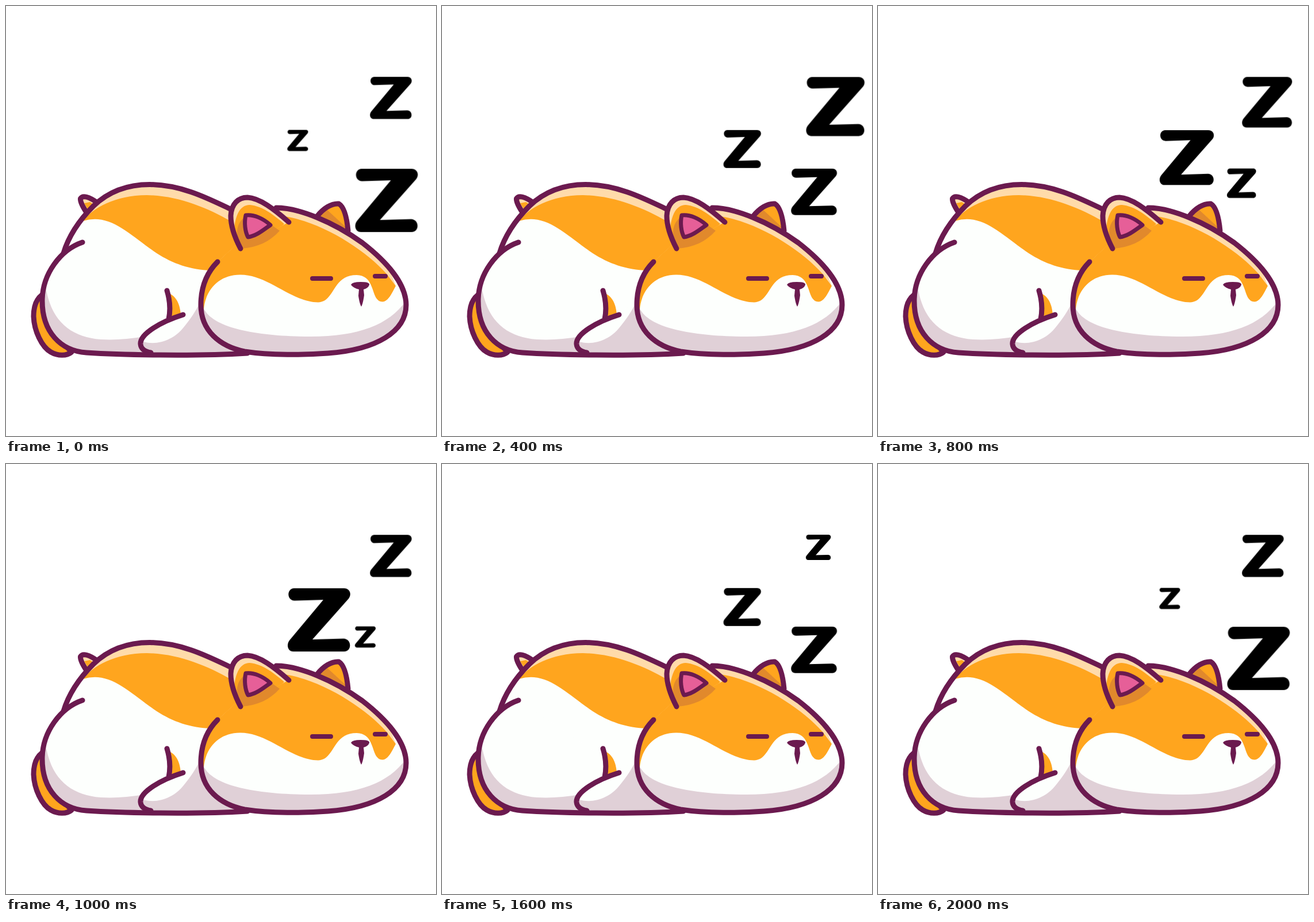
Recreate the animation shown at these times as an HTML page. Size 748 px wide and 748 px high, loop 2100 ms.

```html
<!DOCTYPE html>
<html lang="en">
<head>
<meta charset="utf-8">
<title>Sleeping hamster</title>
<style>
  html, body { margin: 0; width: 100%; height: 100%; overflow: hidden; background: #fff; }
  svg { display: block; width: 100vw; height: 100vh; }

  .white { fill: #fdfffd; }
  .orange { fill: #ffa51e; }
  .light { fill: #ffdbaa; }
  .dark { fill: #e1892c; }
  .shade { fill: #e0d0d7; }
  .pink { fill: #e65f98; }
  .plum { fill: #6b1a4f; }
  .line { stroke: #6b1a4f; stroke-width: 9; stroke-linecap: round; stroke-linejoin: round; }
  .open { fill: none; }

  /* 2000 ms of swelling and shrinking in 100 ms steps, then a 100 ms hold */
  .z { animation: 2100ms steps(10) infinite; }
  .grow { animation-name: grow; }
  .shrink { animation-name: shrink; }
  .swing { animation-name: swing; }

  @keyframes grow {
    0%, 95.238%, 100% { transform: scale(.333); }
    47.619% { transform: scale(1); }
  }
  @keyframes shrink {
    0%, 95.238%, 100% { transform: scale(1); }
    47.619% { transform: scale(.333); }
  }
  @keyframes swing {
    0% { transform: scale(.667); animation-timing-function: steps(5); }
    23.809% { transform: scale(1); }
    71.428% { transform: scale(.333); animation-timing-function: steps(5); }
    95.238%, 100% { transform: scale(.667); }
  }
</style>
</head>
<body>
<svg viewBox="0 0 748 748">
  <defs>
    <path id="back" d="M100 430C109 400 126 374 152 348C178 323 210 310.500 250 310.500C305 311 350 334 390 353"/>
    <path id="backArea" d="M100 430C109 400 126 374 152 348C178 323 210 310.500 250 310.500C305 311 350 334 390 353L420 400V603Z"/>
    <path id="hip" d="M133 411C95 424 63 466 63 513C63 567 95 600 140 603C200 607 330 609.500 420 604"/>
    <path id="head" d="M368 445C348 465 339 492 339 520C339 565 372 592 415 601C460 608 520 607 560 604C645 598 696 566 696 520C696 485 665 447 620 412C570 376 510 351 470 351"/>
    <path id="ear" d="M408 422C397 401 391 382 391 365C392 344 404 333 420 333C441 334 466 353 492 376"/>
    <path id="farEar" d="M541 366C552 352 566 343 579 344C589 350 593 369 595 391"/>
    <path id="zee" d="M12 1H99C109 1 113 11 107 19L44 90L98 88.500C113 89 113 111 99 111H11C1 111 -2 99 4.500 91L63 21L13 22.500C-1 22 -1 1.500 12 1Z"/>
    <clipPath id="inBody"><use href="#backArea"/><use href="#hip"/></clipPath>
    <clipPath id="inHead"><use href="#head"/></clipPath>
    <clipPath id="inEar"><use href="#ear"/></clipPath>
    <clipPath id="inFarEar"><use href="#farEar"/></clipPath>
  </defs>

  <!-- tail and hind foot -->
  <path class="orange line" d="M63 502C51 511 48 526 48 540C49 565 62 593 78 602C90 609 106 609 114 602L75 560Z"/>
  <path class="light line" d="M140 359C134 350 129 341 129.500 335C133 329 144 331 160 343"/>
  <path class="orange" d="M136 343L146 341L156 348L145 358Z"/>

  <!-- body -->
  <g clip-path="url(#inBody)">
    <use href="#backArea" class="white"/>
    <use href="#hip" class="white"/>
    <path class="light" d="M130 374C170 320 220 300 280 300L430 345V400L200 360L140 371Z"/>
    <path class="orange" d="M134 374C150 352 190 329 245 329C300 330 350 351 392 375L430 380V460H358C320 459 290 448 262 430C225 405 195 374 160 371Q147 370 134 374Z"/>
    <path class="shade" d="M68 480C75 545 110 576 165 580Q200 582 240 575V615H50V480Z"/>
  </g>
  <use href="#back" class="open line"/>

  <!-- arm -->
  <path class="orange" d="M286 501C297 507 303 520 304 538L284 547Z"/>
  <path class="white" d="M308 537C270 550 234 571 234 588Q235 602 260 604H350V500Z"/>
  <path class="shade" d="M236 583C262 592 292 581 309 559C321 544 331 530 338 514L350 560L405 603H255Q235 603 236 583Z"/>
  <path class="open line" d="M280 495Q288 521 283 545M308 537C270 549 233 570 234 588Q235 600 252 603"/>
  <use href="#hip" class="open line"/>

  <!-- far ear -->
  <use href="#farEar" class="orange"/>
  <path class="dark" clip-path="url(#inFarEar)" d="M535 368L558 354L600 393Z"/>
  <use href="#farEar" class="open line"/>

  <!-- head -->
  <g clip-path="url(#inHead)">
    <use href="#head" class="light"/>
    <path class="orange" d="M330 530V420L430 350L485 366C550 376 625 424 662 466L678 487L690 530Z"/>
    <path class="white" d="M344 528C347 492 372 467.500 407 467.500C456 467 496 515 543 515.500C573 514 567 468 610 468C645 469 633 514 655 514.500C665 514 671 500 678 487L668 460L710 465V620H330Z"/>
    <path class="shade" d="M344 526C360 561 440 575 530 575C614 575 666 554 695 514L710 620H330Z"/>
  </g>
  <use href="#head" class="open line"/>

  <!-- near ear -->
  <g clip-path="url(#inEar)">
    <use href="#ear" class="light"/>
    <path class="orange" d="M396 400C397 366 406 346 424 346C446 348 465 363 484 379L440 425H405Z"/>
  </g>
  <path class="dark" d="M413 369C403 378 400 390 403 404L410 422C437 420 459 410 476 391L455 376Z"/>
  <use href="#ear" class="open line"/>
  <path class="pink line" style="stroke-width:7" d="M417 364C431 362 448 370 460 381C448 389 436 400 421 402C416 393 414 377 417 364Z"/>

  <!-- face -->
  <path class="open line" style="stroke-width:8" d="M533 474H565M642 470H660"/>
  <path class="plum" d="M600 485Q602 480 617 480Q633 480 632 485Q630 491 622 493L623 503Q621 518 618 523Q615 518 613 504L614 493Q605 491 600 485Z"/>

  <g transform="translate(489 215.200)"><use href="#zee" class="z grow"/></g>
  <g transform="translate(632.500 122.600)"><use href="#zee" class="z swing"/></g>
  <g transform="translate(606.500 282.200)"><use href="#zee" class="z shrink"/></g>
</svg>
</body>
</html>
```
